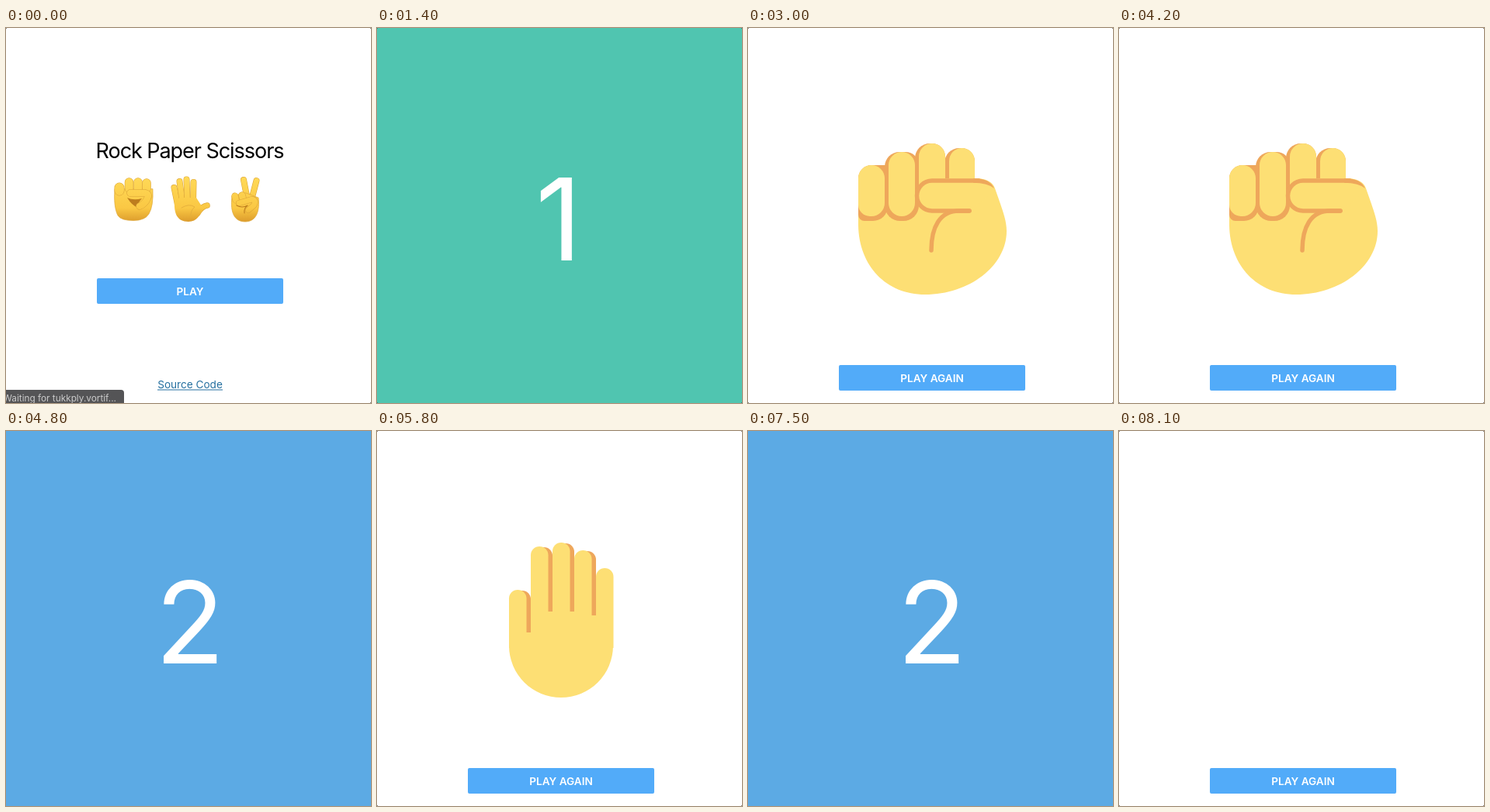
An HTML page with a canvas for the animation above (8200 ms loop, 470 by 484 pixels).

```html
<!DOCTYPE html>
<html lang="en">
<head>
<meta charset="utf-8">
<title>Rock Paper Scissors</title>
<style>
  html, body { margin: 0; width: 100%; height: 100%; overflow: hidden; background: #fff; }
  canvas { display: block; width: 470px; height: 484px; }
</style>
</head>
<body>
<canvas id="stage"></canvas>
<script>
const W = 470, H = 484, LOOP = 8200, TICK = 500;
const canvas = document.getElementById('stage');
const ctx = canvas.getContext('2d');
const ratio = window.devicePixelRatio || 1;
canvas.width = W * ratio;
canvas.height = H * ratio;
ctx.scale(ratio, ratio);

const YELLOW = '#fddf74', ORANGE = '#eea75b';
const COUNT = {
  1: { color: '#50c5b0', x: 230.5 },
  2: { color: '#5caae4', x: 237.5 },
  3: { color: '#af7ac5', x: 237 }
};

// Every round counts 1, 2, 3 at a steady tick, then shows a hand once it has loaded.
const ROUNDS = [
  { start: 1380, hand: rock, load: 80 },
  { start: 4280, hand: paper, load: 0 },
  { start: 6580, load: 0 }
];

function rect(x, y, w, h, color, radius = 0) {
  ctx.fillStyle = color;
  ctx.beginPath();
  ctx.roundRect(x, y, w, h, radius);
  ctx.fill();
}

function path(d, fill, stroke, width) {
  const p = new Path2D(d);
  if (fill) { ctx.fillStyle = fill; ctx.fill(p); }
  if (stroke) {
    ctx.strokeStyle = stroke;
    ctx.lineWidth = width;
    ctx.lineCap = ctx.lineJoin = 'round';
    ctx.stroke(p);
  }
}

function text(str, x, y, font, color, spacing = 0, align = 'center') {
  ctx.font = `${font} Inter, Roboto, sans-serif`;
  ctx.letterSpacing = spacing + 'px';
  ctx.textAlign = align;
  ctx.fillStyle = color;
  ctx.fillText(str, x, y);
}

function button(label, y) {
  rect(117, y, 240, 33, '#52abf9', 2);
  text(label, 237, y + 22, '600 13.6px', '#fff');
}

function corners(color) {
  for (const x of [0, W - 1]) for (const y of [0, H - 1]) rect(x, y, 1, 1, color);
}

function page() {
  rect(0, 0, W, H, '#fff');
  corners('#777');
}

function count(n) {
  const { color, x } = COUNT[n];
  rect(0, 0, W, H, color);
  if (n === 1) corners('#357f73');
  // Centre the ink rather than the advance width.
  ctx.font = '400 147px Inter, Roboto, sans-serif';
  ctx.letterSpacing = '0px';
  ctx.textAlign = 'left';
  const m = ctx.measureText(n);
  ctx.fillStyle = '#fff';
  ctx.fillText(n, x - (m.actualBoundingBoxRight - m.actualBoundingBoxLeft) / 2, 300);
}

function result(hand) {
  page();
  if (hand) hand();
  button('PLAY AGAIN', 435);
}

function rock() {
  path('M142 225V255C143 307 178 344 228 344C285 344 333 307 333 262' +
       'C333 250 329 239 325 227L318 207C315 198 306 194 292 194H142Z', YELLOW);
  rect(142, 177, 38, 72, ORANGE, [17, 0, 19, 8]);
  rect(142, 177, 34, 66, YELLOW, [17, 17, 17, 15]);
  rect(253, 155, 39, 45, ORANGE, [19, 17, 0, 0]);
  rect(259, 155, 33, 45, YELLOW, [17, 17, 0, 0]);
  rect(176, 160, 44, 89, ORANGE, [19, 17, 20, 20]);
  rect(181, 160, 34, 83, YELLOW, 17);
  rect(215, 149, 39, 70, ORANGE, [19, 17, 0, 0]);
  rect(220, 149, 34, 70, YELLOW, [17, 17, 0, 0]);
  // Thumb and its crease.
  path('M292 194H238A21 21 0 0 0 238 236H285L318 211Q312 194 292 194Z', YELLOW);
  path('M297 197H237A19.5 19.5 0 0 0 237 236H285', null, ORANGE, 5.5);
  path('M285 236H272C247 236 236 257 236 287', null, ORANGE, 5.5);
  path('M290 194.2C305 194 313 198 317 207Q309 200 290 199.7Z', ORANGE);
}

function paper() {
  path('M170 260H198V233H304V277A67 67 0 0 1 170 277Z', YELLOW);
  const fingers = [[170, 205, 260], [198, 149, 233], [226, 144, 233], [254, 154, 238], [282, 177, 0]];
  for (const [x, top, end] of fingers) {
    if (end) rect(x + 4, top + 1, 24, end - top - 1, ORANGE, [11, 11, 0, 0]);
  }
  for (const [x, top] of fingers) rect(x, top, 22.5, 280 - top, YELLOW, [11.2, 11.2, 0, 0]);
}

function skin() {
  const g = ctx.createLinearGradient(0, 191, 0, 250);
  g.addColorStop(0, '#ffda58');
  g.addColorStop(0.7, '#fac844');
  g.addColorStop(1, '#dc9c2c');
  return g;
}

// A rounded part with a soft darker rim.
function limb(d, width, fill) {
  path(d, null, '#dda638', width);
  path(d, null, fill, width - 1.2);
}

function smallFist(fill) {
  path('M140 208C139 222 140 234 144 242Q148 248.5 164 248.5Q179 248.5 184 240' +
       'Q190 230 189 208Z', fill, '#dda638', 0.7);
  for (const [x, y] of [[181, 200], [170, 199], [158.5, 199]]) limb(`M${x} ${y}V207`, 11.5, fill);
  limb('M146 206V210', 13, fill);
  path('M156 219Q164 223 175 220Q169 226 170 232Q162 229 156 219Z', '#bd7d1e');
  limb('M160 213H179Q185 214 182 220Q179 227 172 230', 9.5, fill);
}

function smallPalm(fill) {
  limb('M259 229Q252 230 247 239', 7.5, fill);
  for (const d of ['M216.5 206L221 228', 'M223.5 198L227 224', 'M232.5 195.5L233.5 222', 'M241.5 199L241 224']) {
    limb(d, 8, fill);
  }
  path('M217 222C216 239 220 250 235 250C246 250 250 241 254 233L245 219H224Z', fill);
  path('M226 232Q236 226 243 231Q237 236 238 244', null, '#e3ae3d', 0.9);
}

function smallVictory(fill) {
  limb('M306 196L311 222', 8, fill);
  limb('M322.5 197L316 222', 8, fill);
  path('M291 217C289 233 291 250 308 250C323 250 327 235 325 219L309 213Z', fill, '#dda638', 0.7);
  limb('M304 216L305 220', 9.5, fill);
  limb('M294.8 217L296 222', 9, fill);
  limb('M300 226L317 221Q323 222 319 229L312 235', 8, fill);
  path('M297 229Q304 233 311 229Q306 233 307 239', null, '#bd7d1e', 1.1);
}

function home(t) {
  page();
  text('Rock Paper Scissors', 236.5, 168, '400 27px', '#000', -1.05);
  const fill = skin();
  smallFist(fill);
  smallPalm(fill);
  smallVictory(fill);
  button('PLAY', 323);
  text('Source Code', 237, 465, '400 13.6px', '#246f9f');
  rect(195, 466.5, 84, 1, '#246f9f');

  // Loading bubble fades away.
  ctx.globalAlpha = Math.max(0, Math.min(1, 1 - (t - 50) / 350));
  rect(0, 467, 152, 17, '#545456', [0, 4, 0, 0]);
  text('Waiting for tukkply.vortif...', 142, 482, '400 11.8px', '#cbcbcb', 0, 'right');
  ctx.globalAlpha = 1;
}

function draw(t) {
  const round = ROUNDS.findLast(r => t >= r.start);
  if (!round) return home(t);
  const age = t - round.start;
  const n = 1 + Math.floor(age / TICK);
  if (n <= 3) count(n);
  else result(age >= 3 * TICK + round.load ? round.hand : null);
}

const start = performance.now();
function frame() {
  draw((performance.now() - start) % LOOP);
  requestAnimationFrame(frame);
}
frame();
</script>
</body>
</html>
```
